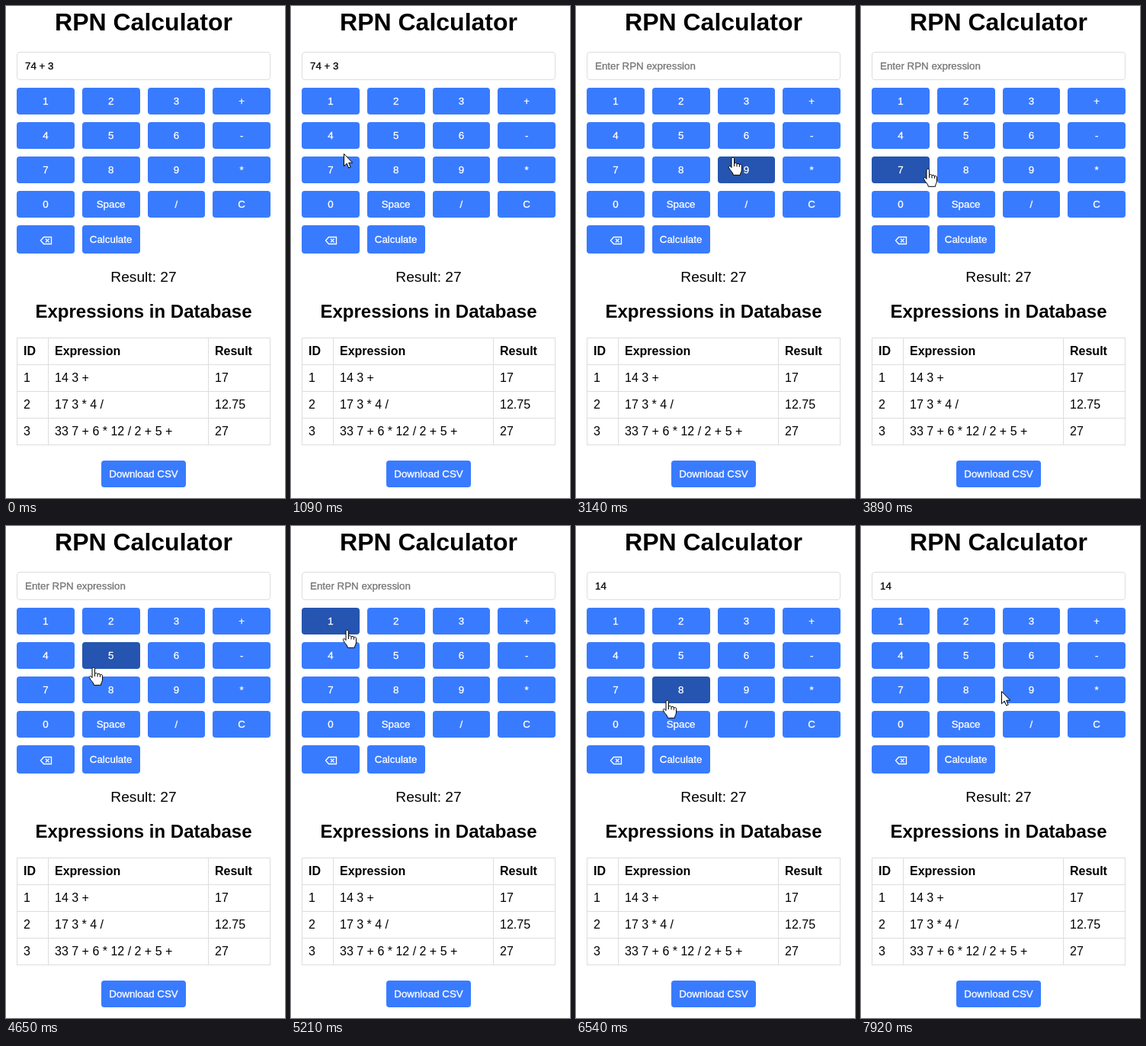
These frames come from a looping animation (366 by 644 pixels, 7990 ms). An HTML page:

```html
<!DOCTYPE html>
<html lang="en">
<head>
<meta charset="utf-8">
<title>RPN Calculator</title>
<style>
  html, body { margin: 0; width: 100%; height: 100%; overflow: hidden; background: #fff; }
  svg { display: block; font-family: "Liberation Sans", Arial, sans-serif; }
  .small { font-size: 13.333px; fill: currentColor; stroke: currentColor; stroke-width: .3; }
  .mid { text-anchor: middle; }
  .bold { font-weight: bold; }
  .key { color: #fff; }
  .key rect { fill: #397bff; }
  .key.hover rect { fill: #2555b0; }
  .line { fill: none; stroke: #ddd; }
  .cursor path { fill: #fff; stroke: #000; stroke-linejoin: round; }
</style>
</head>
<body>
<svg width="366" height="644" viewBox="0 0 366 644">
  <text class="mid bold" x="180.5" y="32" font-size="32">RPN Calculator</text>
  <rect class="line" x="14.5" y="60.5" width="332" height="36" rx="3.5"/>
  <text id="entry" class="small" x="25" y="83"></text>
  <g id="keys"></g>
  <path d="M45.5 307L49.5 302.5H59.5V311.5H49.5ZM52 304.7L56.6 309.3M56.6 304.7L52 309.3" fill="none" stroke="#fff" stroke-width="1.3"/>
  <text class="mid" x="180.5" y="361" font-size="19.2">Result: 27</text>
  <text class="mid bold" x="180.5" y="408" font-size="24">Expressions in Database</text>
  <g id="table" font-size="16"></g>
  <g id="arrow" class="cursor"><path d="M.5.5V16.7L4.2 13.1 6.7 19 9.2 18 6.7 12.2H11.7Z"/></g>
  <g id="hand" class="cursor">
    <path d="M-2 13.5V2C-2-.2 1.5-.2 1.5 2V8.8C2.4 6.8 5 7.4 5 9.2 6 7.6 8.4 8.2 8.4 10 9.4 8.8 11.5 9.4 11.5 11.2V16C11.5 19 9.5 20 9.5 23.3H.3C.3 20-3.5 18-5.5 13.6-6.4 11.4-4 10.4-2 13.5Z"/>
    <path d="M1.5 8.8V12M5 9.2V12.4M8.4 10V12.8"/>
  </g>
</svg>
<script>
const LOOP = 7990, STEP = 70;
const $ = id => document.getElementById(id);

function add(parent, tag, attrs, text = "") {
  const el = document.createElementNS("http://www.w3.org/2000/svg", tag);
  for (const name in attrs) el.setAttribute(name, attrs[name]);
  el.textContent = text;
  return parent.appendChild(el);
}

const keys = [];
function addKey(label, left, right, y, h) {
  const x = Math.round(left), w = Math.round(right) - x;
  const el = add($("keys"), "g", { class: "key" });
  add(el, "rect", { x, y, width: w, height: h, rx: 4 });
  add(el, "text", { class: "small mid", x: (left + right) / 2, y: y + Math.floor(h / 2) + 5 }, label);
  keys.push({ el, x, y, w, h });
}
[..."123+456-789*0", "Space", "/", "C", "", "Calculate"].forEach((label, i) => {
  const left = 14 + i % 4 * 85.75;
  addKey(label, left, left + 75.75, 107 + 45 * (i >> 2), i < 16 ? 35 : 37);
});
addKey("Download CSV", 125, 236, 595, 35);

for (const x of [14, 55, 265, 346]) add($("table"), "path", { class: "line", d: `M${x + .5} 434V575` });
for (let r = 0; r < 5; r++) add($("table"), "path", { class: "line", d: `M14 ${434.5 + 35 * r}H347` });
["ID|Expression|Result", "1|14 3 +|17", "2|17 3 * 4 /|12.75", "3|33 7 + 6 * 12 / 2 + 5 +|27"]
  .forEach((row, r) => row.split("|").forEach((cell, c) =>
    add($("table"), "text", { class: r ? "" : "bold", x: [23, 64, 274][c], y: 457 + 35 * r }, cell)));

// Pointer moves: start, end, target and an optional point the curve bends towards.
// Without a bend the move eases out in a straight line.
const moves = [
  [320, 1090, 69, 193, 330, 90],
  [1160, 1160, 95, 194],
  [1360, 2120, 263, 262, 150, 250],
  [2190, 2190, 298, 256],
  [2260, 2740, 302, 260],
  [3000, 3420, 103, 135, 180, 180],
  [3820, 4030, 83, 222, 83, 247],
  [4230, 5000, 80, 145, 150, 200],
  [5070, 5210, 74, 136],
  [5280, 5770, 68, 133, 140, 160],
  [5910, 6540, 120, 228, 50, 180],
  [6610, 6680, 136, 252],
  [6880, 7640, 140, 255, 154, 290],
  [7710, 7920, 184, 216],
];
const entries = [[0, "74 + 3"], [2530, ""], [5910, "1"], [6190, "14"]];

function pointerAt(t) {
  const i = moves.findLastIndex(m => m[0] <= t);
  if (i < 0) return null;
  const [start, end, x, y, bendX = x, bendY = y] = moves[i];
  const [fromX, fromY] = i ? moves[i - 1].slice(2) : [330, 640];
  const tick = time => Math.floor((time - start) / STEP) + 1;
  const u = Math.min(1, tick(t) / tick(end)), v = 1 - u;
  const curve = (a, b, c) => Math.round(v * v * a + 2 * u * v * b + u * u * c);
  return [curve(fromX, bendX, x), curve(fromY, bendY, y)];
}

function draw(t) {
  const value = entries.findLast(e => e[0] <= t)[1];
  $("entry").textContent = value || "Enter RPN expression";
  $("entry").style.color = value ? "#000" : "#757575";

  const pointer = pointerAt(t), [x, y] = pointer || [-99, -99];
  let over = false;
  for (const k of keys) {
    const hit = x >= k.x && x < k.x + k.w && y >= k.y && y < k.y + k.h;
    k.el.classList.toggle("hover", hit);
    over ||= hit;
  }
  for (const [id, shown] of [["hand", over], ["arrow", !over]]) {
    $(id).setAttribute("transform", `translate(${x} ${y})`);
    $(id).style.display = pointer && shown ? "" : "none";
  }
}

const begin = performance.now();
function frame() {
  draw((performance.now() - begin) % LOOP);
  requestAnimationFrame(frame);
}
frame();
</script>
</body>
</html>
```
